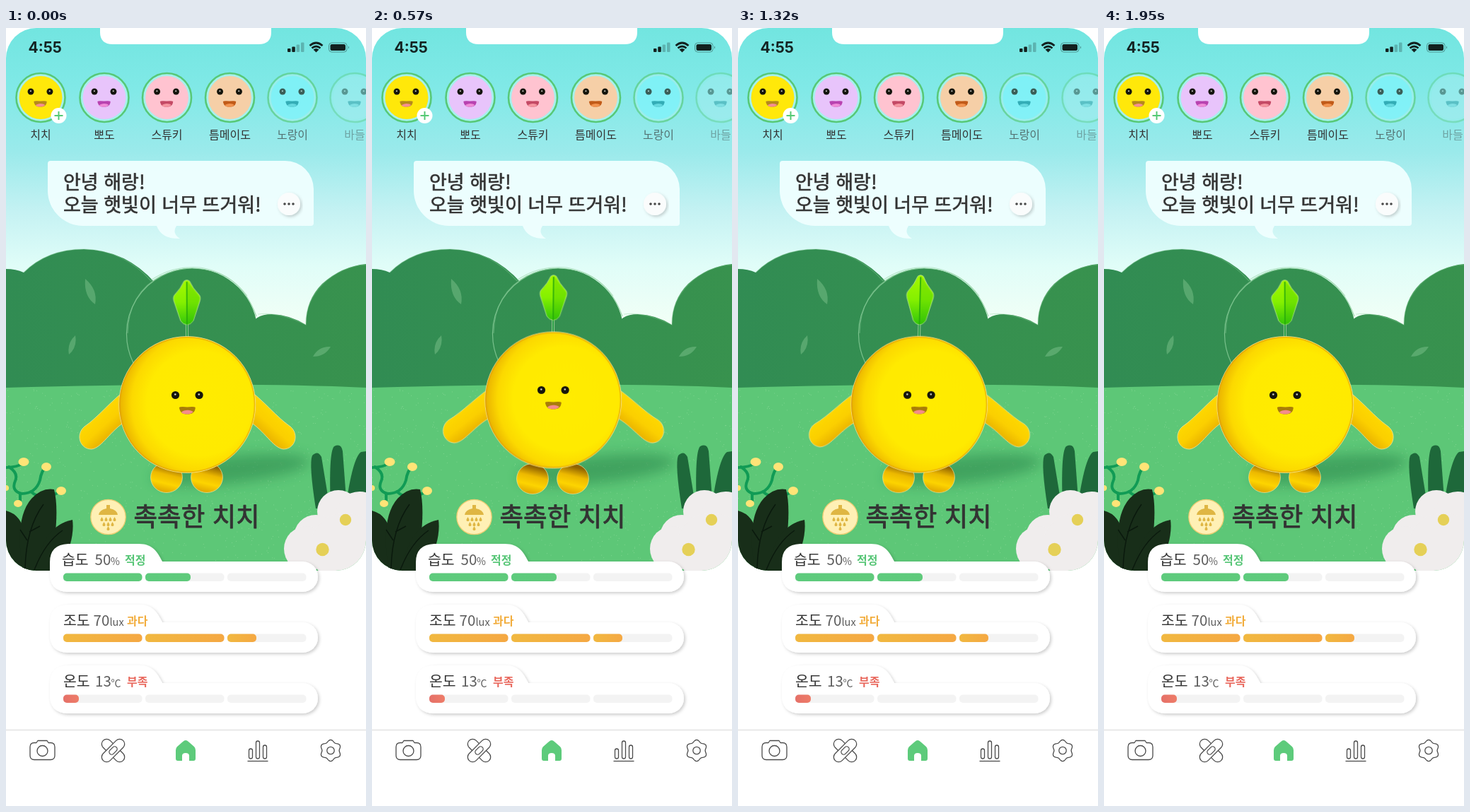
Recreate the animation shown at these times as an HTML page. Size 509 by 1101 pixels, loop 1.98 s.

```html
<!DOCTYPE html>
<html lang="ko">
<head>
<meta charset="utf-8">
<title>촉촉한 치치</title>
<style>
html, body { margin: 0; width: 100%; height: 100%; overflow: hidden; background: #fff; }
svg { display: block; width: 100vw; height: 100vh; }
text { font-family: "Noto Sans CJK KR", "Noto Sans CJK", "Noto Sans KR", sans-serif; fill: #333; }
.medium { stroke: #333; stroke-linejoin: round; }

.rise, .leaf, .bend, .arm {
  animation: 1980ms cubic-bezier(.37, 0, .63, 1) infinite;
}
.rise { animation-name: rise; }
.leaf { animation-name: stretch; }
.bend { animation-name: bend; }
.arm { animation-name: swing; transform-origin: 160px 530px; }

@keyframes rise {
  0%, 7.576%, 37.879%, 68.182%, 98.485%, 100% { transform: translateY(0); }
  22.727%, 53.03%, 83.333% { transform: translateY(var(--rise)); }
}
@keyframes stretch {
  0%, 30.303%, 60.606%, 90.909%, 100% { transform: scaleY(.79); }
  15.152%, 45.455%, 75.758% { transform: scaleY(1.035); }
}
@keyframes bend {
  0%, 100%, 39.394% { transform: rotate(-.3deg); }
  18.182% { transform: rotate(1.4deg); }
  54.545% { transform: rotate(-2.2deg); }
  66.667% { transform: rotate(1.5deg); }
  78% { transform: rotate(2.2deg); }
  98.485% { transform: rotate(-.3deg); }
}
@keyframes swing {
  0%, 3.03%, 98.485%, 100% { transform: rotate(0); }
  18.182% { transform: rotate(4.5deg); }
  39.394% { transform: rotate(3.7deg); }
  54.545% { transform: rotate(1.3deg); }
  66.667% { transform: rotate(4.1deg); }
  81.818% { transform: rotate(2.3deg); }
}
</style>
</head>
<body>
<svg viewBox="0 0 509 1101" preserveAspectRatio="none">
<defs>
  <linearGradient id="sky" x2="0" y2="1">
    <stop offset="0" stop-color="#72e5e0"/>
    <stop offset="0.2" stop-color="#80e9e7"/>
    <stop offset="0.42" stop-color="#9beaeb"/>
    <stop offset="0.62" stop-color="#c5f2f3"/>
    <stop offset="0.8" stop-color="#e0fdf8"/>
    <stop offset="1" stop-color="#f2fff6"/>
  </linearGradient>
  <linearGradient id="bushes" gradientUnits="userSpaceOnUse" x1="0" y1="400" x2="509" y2="380">
    <stop offset="0" stop-color="#318c53"/>
    <stop offset="1" stop-color="#38924e"/>
  </linearGradient>
  <radialGradient id="ball" cx=".59" cy=".49" r=".62">
    <stop offset="0" stop-color="#ffec00"/>
    <stop offset=".62" stop-color="#ffea00"/>
    <stop offset=".8" stop-color="#fcd900"/>
    <stop offset=".92" stop-color="#edb900"/>
    <stop offset="1" stop-color="#cd9200"/>
  </radialGradient>
  <linearGradient id="limb" x1="0" y1="0" x2=".7" y2="1">
    <stop offset="0" stop-color="#f0b900"/>
    <stop offset=".3" stop-color="#ffdf00"/>
    <stop offset=".65" stop-color="#fbcf00"/>
    <stop offset="1" stop-color="#d99900"/>
  </linearGradient>
  <linearGradient id="foot" x1=".65" x2=".4" y2="1">
    <stop offset=".12" stop-color="#8f6200"/>
    <stop offset=".42" stop-color="#edb900"/>
    <stop offset=".7" stop-color="#fdd400"/>
    <stop offset="1" stop-color="#dda300"/>
  </linearGradient>
  <linearGradient id="blade" x2="0" y2="1">
    <stop offset="0" stop-color="#a5f800"/>
    <stop offset=".5" stop-color="#84f000"/>
    <stop offset="1" stop-color="#32c60a"/>
  </linearGradient>
  <linearGradient id="green"><stop stop-color="#5ecb7d"/><stop offset="1" stop-color="#5fca7b"/></linearGradient>
  <linearGradient id="orange"><stop stop-color="#f1b840"/><stop offset="1" stop-color="#f5a843"/></linearGradient>
  <linearGradient id="red"><stop stop-color="#e57068"/><stop offset="1" stop-color="#ee7c68"/></linearGradient>
  <filter id="blur" x="-30%" y="-60%" width="160%" height="220%"><feGaussianBlur stdDeviation="9"/></filter>
  <filter id="shadow" x="-10%" y="-20%" width="120%" height="150%">
    <feDropShadow dx="2" dy="2" stdDeviation="2" flood-color="#000" flood-opacity=".2"/>
  </filter>
  <clipPath id="scene"><rect width="509" height="768" rx="43"/></clipPath>
  <g id="face">
    <circle cx="-16.8" r="5.6" fill="#15150c"/><circle cx="16.8" r="5.6" fill="#15150c"/>
    <circle cx="-17" cy="-1" r="1.3" fill="#fff" opacity=".8"/><circle cx="16.5" cy="-1" r="1.3" fill="#fff" opacity=".8"/>
    <path d="M-11.500 17.500Q-10 16 0 17Q10 16 11.500 17.500C11 25 7 27 0 27C-7 27-10 25-11.500 17.500Z" fill="currentColor"/>
    <path d="M-8.500 24.500C-5 20.500 5 20 8.500 24Q5 27 0 27Q-6 27-8.500 24.500Z" fill="var(--tongue)"/>
  </g>
  <path id="armShape" d="M170 512C152 524 128 553 111 564C98 575 104 596 121 596C136 594 147 570 170 556Z"
    fill="url(#limb)" stroke="#f3e4a0" stroke-width=".8"/>
  <ellipse id="footShape" cy="636" rx="22.400" ry="21.500" fill="url(#foot)" stroke="#f3e4a0" stroke-width=".7"/>
</defs>

<g clip-path="url(#scene)">
  <rect width="509" height="420" fill="url(#sky)"/>
  <g fill="url(#bushes)">
    <path d="M0 341Q14 341 25 346Q58 313 110 313Q170 314 211 361L230 515H0Z"/>
    <path d="M345 425Q350 405 376 405Q402 406 424 420Q424 385 447 362Q475 337 509 334V515H345Z"/>
    <circle cx="263" cy="433" r="93"/>
    <path d="M170 433H356V515H170Z"/>
  </g>
  <g fill="none" stroke="#8ccf9c" stroke-width="1.2" opacity=".8">
    <path d="M180 474A93 93 0 0 1 263 340Q330 341 354 408"/>
    <path d="M172 432Q173 375 220 350M205 357Q235 336 275 339Q315 345 341 379" opacity=".6"/>
    <path d="M25 346Q60 312 114 313Q168 316 205 358M356 405Q385 401 424 420Q423 387 449 361Q476 337 509 335" opacity=".45"/>
  </g>
  <g fill="#7cc18b" opacity=".5">
    <path d="M112 355Q130 370 126 391Q110 380 112 355Z"/>
    <path d="M98 435Q101 452 89 462Q86 446 98 435Z"/>
    <path d="M434 465Q442 450 459 451Q451 465 434 465Z"/>
  </g>
  <path d="M0 509Q150 505 260 505Q400 504 509 509V768H0Z" fill="#5dc777"/>
  <path id="specks" stroke="#a2e2a9" stroke-width="1" opacity=".55"/>
  <ellipse cx="318" cy="625" rx="112" ry="19" fill="#247c45" opacity=".48" filter="url(#blur)" transform="rotate(-6 318 625)"/>

  <g fill="none" stroke="#119b55" stroke-width="4" stroke-linecap="round">
    <path d="M-3 622Q16 622 24 616M4 621Q18 630 13 641Q7 655 22 659Q42 659 48 640Q50 626 57 621M35 656Q52 671 76 656M20 659V672"/>
  </g>
  <g fill="#ffe477">
    <ellipse cx="25" cy="614" rx="7.500" ry="6"/><ellipse cx="57" cy="621" rx="7" ry="6"/>
    <ellipse cx="78" cy="655" rx="7" ry="6"/><ellipse cx="17" cy="673" rx="6" ry="5"/><circle cy="651" r="4"/>
  </g>
  <g fill="#182e19">
    <path d="M0 683Q23 689 27 719L40 768H0Z"/>
    <path d="M24 768Q11 695 36 666Q51 650 68 653Q77 688 62 768Z"/>
    <path d="M42 768Q52 704 94 696Q98 724 76 768Z"/>
    <path d="M27 766Q28 708 53 674M30 725L20 710M33 713L48 705M40 767Q55 728 80 711" fill="none" stroke="#0a190d" stroke-width="1.500"/>
  </g>
  <g fill="#1e683a">
    <path d="M438 680Q428 617 433 605Q441 597 446 607L458 680Z"/>
    <path d="M459 680Q456 600 464 592Q474 587 476 599L482 680Z"/>
    <path d="M480 680Q490 608 502 600L509 599V690Z"/>
  </g>
  <g fill="#f0eded">
    <circle cx="470" cy="684" r="30"/><circle cx="500" cy="690" r="34"/>
    <circle cx="438" cy="720" r="31"/><circle cx="425" cy="737" r="32"/><circle cx="480" cy="736" r="50"/>
  </g>
  <g fill="#e5d057"><circle cx="480" cy="696" r="8.200"/><circle cx="447.500" cy="738" r="9.200"/></g>
</g>

<path d="M133 0H375V6Q375 23 357 23H151Q133 23 133 6Z" fill="#fff"/>
<text x="31.500" y="35" font-size="21" style="font-family:Inter,sans-serif;font-weight:700;fill:#142322">4:55</text>
<g fill="#13211f">
  <rect x="398" y="29" width="4.500" height="5" rx="1"/><rect x="404.300" y="26.500" width="4.500" height="7.500" rx="1"/>
  <g opacity=".25"><rect x="410.600" y="23.500" width="4.500" height="10.500" rx="1"/><rect x="417" y="20.500" width="4.500" height="13.500" rx="1"/></g>
  <path d="M438.500 34.500L434.500 30.500Q438.500 27.500 442.500 30.500Z"/>
  <path d="M429.500 25Q438.500 17 447.500 25M432.500 28.500Q438.500 23.500 444.500 28.500" fill="none" stroke="#13211f" stroke-width="2.700"/>
  <rect x="456.500" y="21" width="25.500" height="13" rx="4" fill="none" stroke="#13211f" opacity=".4"/>
  <rect x="458.500" y="23" width="21.500" height="9" rx="2.200"/><path d="M484 25.500Q486 27.500 484 29.500Z" opacity=".5"/>
</g>

<g id="avatars"></g>
<circle cx="74.500" cy="124" r="11" fill="#fff"/>
<path d="M68.500 124H80.500M74.500 118V130" stroke="#55c974" stroke-width="2"/>

<path d="M63 188H395A40 40 0 0 1 435 228V276Q435 280 431 280H241Q234 291 246 298Q220 299 213 280H109A50 50 0 0 1 59 230V192Q59 188 63 188Z" fill="#f0ffff" opacity=".95"/>
<g class="medium" font-size="27" stroke-width=".65">
  <text x="81" y="227.500">안녕 해랑!</text>
  <text x="81" y="260">오늘 햇빛이 너무 뜨거워!</text>
</g>
<circle cx="400" cy="249" r="16" fill="#fafcfc" filter="url(#shadow)"/>
<path d="M394 249h.01M400 249h.01M406 249h.01" stroke="#484848" stroke-width="3.600" stroke-linecap="round"/>

<g id="character">
  <g class="rise" style="--rise:3px">
    <use href="#footShape" x="227"/><use href="#footShape" x="284"/>
  </g>
  <g class="rise" style="--rise:-9px">
    <g class="arm"><use href="#armShape"/></g>
    <g transform="translate(513) scale(-1 1)"><g class="arm"><use href="#armShape"/></g></g>
  </g>
  <g class="rise" style="--rise:-10px">
    <g transform="translate(256 437)"><g class="bend">
      <path d="M0 2V-20" stroke="#b9dba8" stroke-width="3.500"/>
      <path d="M0 2V-20" stroke="#249b43" stroke-width="2"/>
      <g transform="translate(0 -17)"><g class="leaf">
        <path d="M-4-78Q0-82 4-78Q8-66 17-54Q20-50 18.500-43L9-7Q5 0 0 0Q-5 0-9-7L-18.500-43Q-20-50-17-54Q-8-66-4-78Z" fill="url(#blade)" stroke="#c5f09a" stroke-width=".8"/>
        <path d="M0-79L18.500-48L9-7Q5 0 0 0Z" fill="#31b900" opacity=".25"/>
        <path d="M0-77V0" stroke="#26a80c" stroke-width="1.600"/>
      </g></g>
    </g></g>
    <circle cx="256.200" cy="533" r="96.500" fill="url(#ball)" stroke="#f2e3a0" stroke-width=".8"/>
    <circle cx="256.200" cy="533" r="95.300" fill="none" stroke="#e39d00" stroke-width="1.600" opacity=".6"/>
    <g class="rise" style="--rise:-1px">
      <use href="#face" x="256.300" y="519.500" style="color:#a87c08;--tongue:#f48c8b"/>
    </g>
  </g>
</g>

<circle cx="144.500" cy="692" r="24.700" fill="#fff0b5" stroke="#edcd72" stroke-width="1.300"/>
<g fill="#dfb643">
  <path d="M142 675H147V680Q157 682 158 689H131Q132 682 142 680Z"/>
  <path id="drops"/>
</g>
<text class="medium" x="180.500" y="705" font-size="36.500" stroke-width=".9">촉촉한 치치</text>

<g id="cards"></g>

<path d="M0 993.500H509" stroke="#e2e2e2" stroke-width="1.400"/>
<g fill="none" stroke="#4b4b4b" stroke-width="1.300" stroke-linejoin="round">
  <path d="M40 1011.500H43L45 1008.500H58L60 1011.500H63Q69 1011.500 69 1017.500V1029.500Q69 1035.500 63 1035.500H40Q34 1035.500 34 1029.500V1017.500Q34 1011.500 40 1011.500Z"/>
  <circle cx="51.500" cy="1023" r="7.500"/>
  <g transform="translate(151.500 1022.500)">
    <rect x="-20" y="-7" width="40" height="14" rx="7" transform="rotate(45)"/>
    <rect x="-20" y="-7" width="40" height="14" rx="7" fill="#fff" transform="rotate(-45)"/>
    <rect x="-6.500" y="-3.500" width="13" height="7" rx="3.500" transform="rotate(-45)"/>
  </g>
  <path d="M341.500 1037.500H370.500"/>
  <rect x="343.500" y="1020" width="5" height="14" rx="2.500"/><rect x="353.500" y="1009" width="5" height="25" rx="2.500"/><rect x="363.500" y="1015" width="5" height="19" rx="2.500"/>
  <path id="gear"/><circle cx="459" cy="1022.500" r="5.200"/>
</g>
<path d="M254 1008Q256 1008 258 1010L266 1017Q268 1019 268 1022V1034Q268 1037 265 1037H259V1030Q259 1026 254 1026Q249 1026 249 1030V1037H243Q240 1037 240 1034V1022Q240 1019 242 1017L250 1010Q252 1008 254 1008Z" fill="#5dcb7b"/>
</svg>

<script>
const byId = id => document.getElementById(id);

const avatars = [
  [49, "치치", "#ffe80a", "#b5891b", "#f58f91", 1],
  [139, "뽀도", "#e8c4fb", "#b842b0", "#f08bd8", 1],
  [227.5, "스튜키", "#ffc3d0", "#c44965", "#f595a0", 1],
  [316.5, "틈메이도", "#f6cfa7", "#c15a18", "#f2934f", 1],
  [405, "노랑이", "#7ff6ff", "#078d9c", "#52cfda", .65],
  [493, "바들", "#b3eff5", "#147f8e", "#72cfda", .38],
];
byId("avatars").innerHTML = avatars.map(([x, name, skin, mouth, tongue, opacity]) => `
  <g opacity="${opacity}">
    <circle cx="${x}" cy="98.500" r="34.500" fill="#a5f1ee" stroke="#57c977" stroke-width="2.600"/>
    <circle cx="${x}" cy="98.500" r="30.500" fill="${skin}"/>
    <g transform="translate(${x - .5} 90) scale(.8)" style="color:${mouth};--tongue:${tongue}"><use href="#face"/></g>
    <text x="${x}" y="157" font-size="16" text-anchor="middle">${name}</text>
  </g>`).join("");

// Each card: top, label, label x, value, value x, unit, unit x, unit size, state, state x, text colour, fill, filled up to
const cards = [
  [730, "습도", 79, "50", 125.5, "%", 148, 14, "적정", 168, "#55c575", "green", 261],
  [816, "조도", 81, "70", 123.5, "lux", 146.5, 14.5, "과다", 171, "#f2ad3d", "orange", 354],
  [902, "온도", 81, "13", 126, "℃", 148.5, 14, "부족", 171, "#e9695e", "red", 103],
];
const bar = (x, right, fill) =>
  `<rect x="${x}" y="41.500" width="${right - x}" height="11.500" rx="5" fill="${fill}"/>`;
byId("cards").innerHTML = cards.map(([y, label, lx, value, vx, unit, ux, size, state, sx, color, fill, level]) => `
  <g transform="translate(0 ${y})">
    <path d="M88 0H188C207 0 214 11 221 25H419.500A21.500 21.500 0 0 1 419.500 68H86Q62 66 62 43V26Q62 1 88 0Z" fill="#fff" filter="url(#shadow)"/>
    <text x="${lx}" y="29.500" font-size="20.500">${label}</text>
    <g font-weight="300">
      <text x="${vx}" y="29.500" font-size="20.500" style="fill:#5c5c5c">${value}</text>
      <text x="${ux}" y="29.500" font-size="${size}" style="fill:#5c5c5c">${unit}</text>
    </g>
    <text x="${sx}" y="29" font-size="16" font-weight="700" style="fill:${color}">${state}</text>
    ${[81, 197, 313].map(x => bar(x, x + 111.5, "#f3f3f3") +
      (level > x ? bar(x, Math.min(x + 111.5, level), `url(#${fill})`) : "")).join("")}
  </g>`).join("");

let seed = 7;
const random = () => (seed = seed * 16807 % 2147483647) / 2147483647;
byId("specks").setAttribute("d", Array.from({ length: 900 }, () =>
  `M${(random() * 509).toFixed(1)} ${(511 + random() * 255).toFixed(1)}h.9`).join(""));

byId("drops").setAttribute("d", [[135, 692], [141, 692], [147, 692], [153, 692], [138, 699], [144, 699], [150, 699], [144, 705]]
  .map(([x, y]) => `M${x + .5} ${y}q-4 6 0 6q4 0 0-6Z`).join(""));

byId("gear").setAttribute("d", "M" + Array.from({ length: 72 }, (_, i) => {
  const a = i * Math.PI / 36, r = 13.6 - 1.5 * Math.cos(6 * a);
  return `${(459 + r * Math.cos(a)).toFixed(2)} ${(1022.5 + r * Math.sin(a)).toFixed(2)}`;
}).join("L") + "Z");
</script>
</body>
</html>
```
